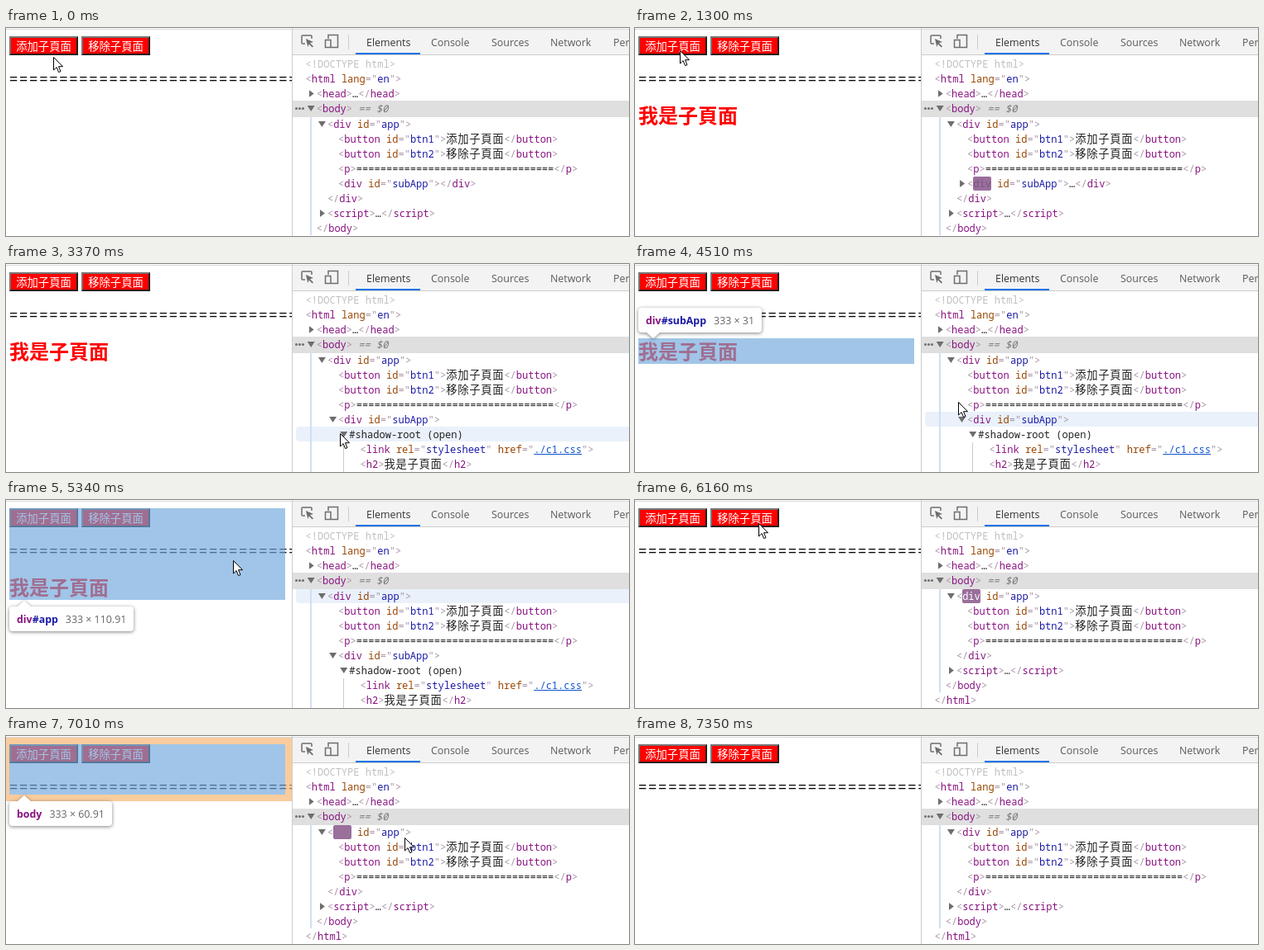
Animation, 752 px wide and 252 px high, one loop 7.96 s. Source, as an HTML page:

```html
<!DOCTYPE html>
<html lang="en">
<head>
<meta charset="utf-8">
<style>
html, body { margin: 0; width: 752px; height: 252px; overflow: hidden; background: #fff; }
div, span, svg { position: absolute; box-sizing: border-box; }
div span { position: static; }
#page { left: 0; top: 0; width: 345px; height: 252px; overflow: hidden; }
.btn { top: 10px; width: 83px; height: 23px; border: 2px outset #767676; background: red; color: #fff;
  font: 13.33px/19px "Noto Sans CJK TC", "Noto Sans CJK", sans-serif; text-align: center; white-space: nowrap; }
.btn.down { border-style: inset; }
#rule { left: 4px; top: 51px; font: 18px/20px "Noto Sans", sans-serif; letter-spacing: 1.75px; white-space: nowrap; color: #000; }
#title { left: 4px; top: 89px; font: bold 24px/31px "Noto Sans CJK TC", "Noto Sans CJK", sans-serif; color: red; white-space: nowrap; }
#box { border: 0 solid rgba(246,178,107,.66); background: rgba(111,168,220,.66); background-clip: padding-box; }
#tip { left: 4px; height: 30px; padding: 0 9px; border-radius: 4px; background: #fff; white-space: nowrap;
  font: 12.4px/31px "Open Sans", sans-serif; color: #666; filter: drop-shadow(0 1px 2px rgba(0,0,0,.5)); }
#tip b { color: #1a1aa6; margin-right: 9px; }
#tip b span { color: #881280; }
#tip::before { content: ""; position: absolute; left: 10px; top: -7px; border: 8px solid transparent; border-top: 0; border-bottom: 7px solid #fff; }
#tip.above::before { top: 30px; border-top: 7px solid #fff; border-bottom: 0; }
#panel { left: 345px; top: 0; width: 407px; height: 252px; border-left: 1px solid #ccc; background: #fff; overflow: hidden; }
#bar { left: 0; top: 2px; width: 407px; height: 31px; background: #f3f3f3; border-bottom: 1px solid #ccc; }
#bar div { top: 7px; font: 12.4px/18px "Open Sans", sans-serif; color: #5a5a5a; white-space: nowrap; }
#bar #active { left: 76px; top: 28px; width: 78px; height: 2px; background: #1a73e8; }
#bar #split { left: 67px; top: 6px; width: 1px; height: 18px; background: #ccc; }
#bar svg { left: 9px; top: 3px; fill: none; stroke: #6e6e6e; stroke-width: 1.5; }
#selected { left: 0; top: 88px; width: 407px; height: 20px; background: #dfdfdf; }
#hover { left: 4px; width: 403px; height: 18px; border-radius: 4px 0 0 4px; background: #eaf1fb; }
#guide { left: 21px; top: 108px; width: 2px; background: #cfdff5; }
#shadowGuide { left: 61px; top: 216px; width: 1px; height: 36px; background: #ccc; }
#dots { left: 3px; top: 96px; width: 3px; height: 3px; border-radius: 50%; background: #6e6e6e;
  box-shadow: 4px 0 #6e6e6e, 8px 0 #6e6e6e; }
#tree { left: 0; top: 1px; }
.row { height: 18px; font: 12.06px/18px "Noto Sans Mono", monospace; white-space: pre; color: #222; }
.row.open::before, .row.shut::before { content: ""; position: absolute; background: #6e6e6e; }
.row.open::before { left: -11px; top: 5px; width: 9px; height: 7px; clip-path: polygon(0 0, 100% 0, 50% 100%); }
.row.shut::before { left: -9px; top: 4px; width: 6px; height: 9px; clip-path: polygon(0 0, 100% 50%, 0 100%); }
.tag { color: #a894a6; }
.name { color: #881280; }
.attr { color: #994500; }
.val { color: #1a1aa6; }
.link { color: #1155cc; text-decoration: underline; }
.cjk { font: 13.3px/0 "Noto Sans CJK TC", "Noto Sans CJK", sans-serif; letter-spacing: .7px; }
.faint { color: #c0c0c0; }
.self { color: #777; font-style: italic; }
.flashing .mark { border-radius: 2px; background: #9a6f9b; color: color-mix(in srgb, #fff, #6b3f70 var(--k)); }
#top { left: 0; top: 1px; width: 752px; height: 1px; background: #d8d8d8; }
#cursor { left: -1px; top: 0; overflow: visible; }
</style>
</head>
<body>
<div id="page">
  <div class="btn" id="btn1" style="left:4px">添加子頁面</div>
  <div class="btn" id="btn2" style="left:91px">移除子頁面</div>
  <div id="rule">=================================</div>
  <div id="title">我是子頁面</div>
  <div id="box"></div>
  <div id="tip"></div>
</div>
<div id="panel">
  <div id="bar">
    <svg width="50" height="24">
      <path d="M6 14H3a1 1 0 0 1-1-1V5a1 1 0 0 1 1-1H13a1 1 0 0 1 1 1V8"/>
      <path d="M7 8l9 4-4 1.3 4 4-1.3 1.3-4-4L9.300 18Z" fill="#6e6e6e" stroke="none"/>
      <path d="M34 8V3.500H45.500V18.500H37M30.500 9.500H37V18.500H30.500Z"/>
    </svg>
    <div id="split"></div>
    <div style="left:89px;color:#333">Elements</div>
    <div style="left:167px">Console</div>
    <div style="left:240px">Sources</div>
    <div style="left:311px">Network</div>
    <div style="left:387px">Performance</div>
    <div id="active"></div>
  </div>
  <div id="hover"></div>
  <div id="selected"></div>
  <div id="guide"></div>
  <div id="shadowGuide"></div>
  <div id="dots"></div>
  <div id="tree"></div>
</div>
<div id="top"></div>
<svg id="cursor" width="13" height="20"><path d="M.5 .5V16L4.100 12.600 6.600 18.600 9 17.600 6.500 11.700H11.500Z" fill="#fff" stroke="#000"/></svg>
<script>
const LOOP = 7960, LAG = 50;
const ADDED = 860, OPENED = 2470, SHADOW = 3280, REMOVED = 6160;
const $ = id => document.getElementById(id);
const between = (t, a, b) => t >= a && t < b;
const show = (el, on) => { el.style.visibility = on ? 'visible' : 'hidden'; };

// Pointer path: time, x, y
const path = [
  [0, 58, 35], [90, 58, 35], [180, 55, 27], [1550, 55, 27], [2220, 395, 188],
  [2820, 395, 188], [3130, 404, 205], [4050, 404, 205], [4240, 437, 198],
  [4450, 437, 198], [4510, 391, 167], [4820, 398, 172], [5100, 398, 172],
  [5290, 365, 116], [5340, 275, 73], [5890, 150, 28], [6250, 150, 28],
  [6810, 475, 87], [6890, 475, 87], [7290, 505, 253], [LOOP, 505, 253]
];
function pointer(t) {
  const i = Math.max(1, path.findIndex(p => p[0] > t));
  const [t0, x0, y0] = path[i - 1], [t1, x1, y1] = path[i];
  const k = Math.max(0, (t - t0) / (t1 - t0));
  const e = t1 - t0 > 300 ? k * k * (3 - 2 * k) : k;
  return [x0 + (x1 - x0) * e, y0 + (y1 - y0) * e];
}

const span = (cls, text) => `<span class="${cls}">${text}</span>`;
const cjk = text => span('cjk', text);
function tag(name, attrs = '', mark = '') {
  const list = attrs.replace(/(\w+)="([^"]*)"/g, (_, key, val) =>
    `${span('attr', key)}="${span(val.startsWith('./') ? 'link' : 'val', val)}"`);
  return span('tag', `&lt;${span('name ' + mark, name)}${list && ' ' + list}&gt;`);
}
const end = name => span('tag', `&lt;/${span('name', name)}&gt;`);

// Each line: depth, markup, arrow, highlighted element
function lines(stage) {
  const sub = mark => tag('div', 'id="subApp"', mark);
  const inner = [
    [[3, sub() + end('div')]],
    [[3, sub('mark') + '…' + end('div'), 'shut', 'sub']],
    [[3, sub(), 'open', 'sub'], [4, '#shadow-root (open)', 'shut'], [3, end('div'), '', 'sub']],
    [[3, sub(), 'open', 'sub'], [4, '#shadow-root (open)', 'open'],
      [5, tag('link', 'rel="stylesheet" href="./c1.css"')],
      [5, tag('h2') + cjk('我是子頁面') + end('h2')], [3, end('div'), '', 'sub']],
    []
  ][stage];
  return [
    [0, span('faint', '&lt;!DOCTYPE html&gt;')],
    [0, tag('html', 'lang="en"'), '', 'html'],
    [1, tag('head') + '…' + end('head'), 'shut'],
    [1, tag('body') + span('self', ' == $0'), 'open', 'body'],
    [2, tag('div', 'id="app"', stage === 4 ? 'mark' : ''), 'open', 'app'],
    [3, tag('button', 'id="btn1"') + cjk('添加子頁面') + end('button'), '', 'btn1'],
    [3, tag('button', 'id="btn2"') + cjk('移除子頁面') + end('button'), '', 'btn2'],
    [3, tag('p') + '='.repeat(33) + end('p'), '', 'p'],
    ...inner,
    [2, end('div'), '', 'app'],
    [2, tag('script') + '…' + end('script'), 'shut'],
    [1, end('body'), '', 'body'],
    [0, end('html'), '', 'html']
  ];
}
const rowTop = i => Math.floor(34.6 + 18.1 * i);
const rowAt = y => Math.floor((y - 34.6) / 18.1);

// Label, x, y, width, height, vertical margin, side margin
function element(key, hasChild) {
  const h = hasChild ? 110.91 : 60.91;
  return {
    html: ['html', '', -4, 2, 349, h + 28, 0, 0],
    body: ['body', '', 4, 10, 333, h, 8, 8],
    app: ['div', '#app', 4, 10, 333, h, 0, 0],
    btn1: ['button', '#btn1', 4, 10, 83, 23, 0, 0],
    btn2: ['button', '#btn2', 91, 10, 83, 23, 0, 0],
    p: ['p', '', 4, 50, 333, 20.91, 16, 0],
    sub: ['div', '#subApp', 4, 90, 333, 31, 0, 0]
  }[key];
}
function highlight(el) {
  show($('box'), el);
  show($('tip'), el);
  if (!el) return;
  const [name, id, x, y, w, h, mv, mh] = el;
  const bottom = Math.round(y + h), above = y >= 80;
  Object.assign($('box').style, {
    left: x - mh + 'px', top: y - mv + 'px', width: w + 2 * mh + 'px',
    height: bottom - y + 2 * mv + 'px', borderWidth: `${mv}px ${mh}px`
  });
  $('tip').className = above ? 'above' : '';
  $('tip').style.top = (above ? y - 37 : bottom + 8) + 'px';
  $('tip').style.left = Math.max(4, x) + 'px';
  $('tip').innerHTML = `<b>${span('', name)}${id}</b>${w} × ${+h.toFixed(2)}`;
}

let stage = -1, rows, lit;
function setStage(next) {
  stage = next;
  rows = lines(stage);
  $('tree').innerHTML = rows.map(([depth, html, arrow = ''], i) =>
    `<div class="row ${arrow}" style="left:${15.5 + 13.2 * depth}px;top:${rowTop(i)}px">${html}</div>`).join('');
  $('guide').style.height = rowTop(rows.length - 1) - 108 + 'px';
  show($('shadowGuide'), stage === 3);
}

function draw(now) {
  const t = now % LOOP;
  const next = [ADDED, OPENED, SHADOW, REMOVED].filter(s => t >= s).length;
  if (next !== stage) setStage(next);

  const [x, y] = pointer(t);
  $('cursor').style.transform = `translate(${Math.round(x)}px, ${Math.round(y)}px)`;
  show($('cursor'), t < 7340);

  const hasChild = between(t, ADDED, REMOVED);
  show($('title'), hasChild);
  $('btn1').classList.toggle('down', between(t, 770, ADDED));
  $('btn2').classList.toggle('down', between(t, 6070, REMOVED));

  const flash = between(t, ADDED, 1410) ? (t - ADDED) / 500 : between(t, REMOVED, 7350) ? (t - REMOVED) / 1190 : -1;
  $('tree').classList.toggle('flashing', flash >= 0);
  $('tree').style.setProperty('--k', Math.min(1, Math.max(0, flash)) * 100 + '%');

  // The inspector reacts slightly behind the pointer
  const [hx, hy] = pointer(Math.max(0, t - LAG));
  const row = hx >= 346 && hy < 252 ? rowAt(hy) : -1;
  const redrawing = between(t, OPENED, OPENED + 30) || between(t, SHADOW, SHADOW + 90);
  show($('hover'), row >= 0 && !redrawing);
  $('hover').style.top = rowTop(row) + 'px';
  const key = rows[row] && rows[row][3], id = key + hasChild;
  if (id !== lit) { lit = id; highlight(element(key, hasChild)); }

  requestAnimationFrame(tick);
}
const start = performance.now();
function tick() { draw(performance.now() - start); }
tick();
</script>
</body>
</html>
```
